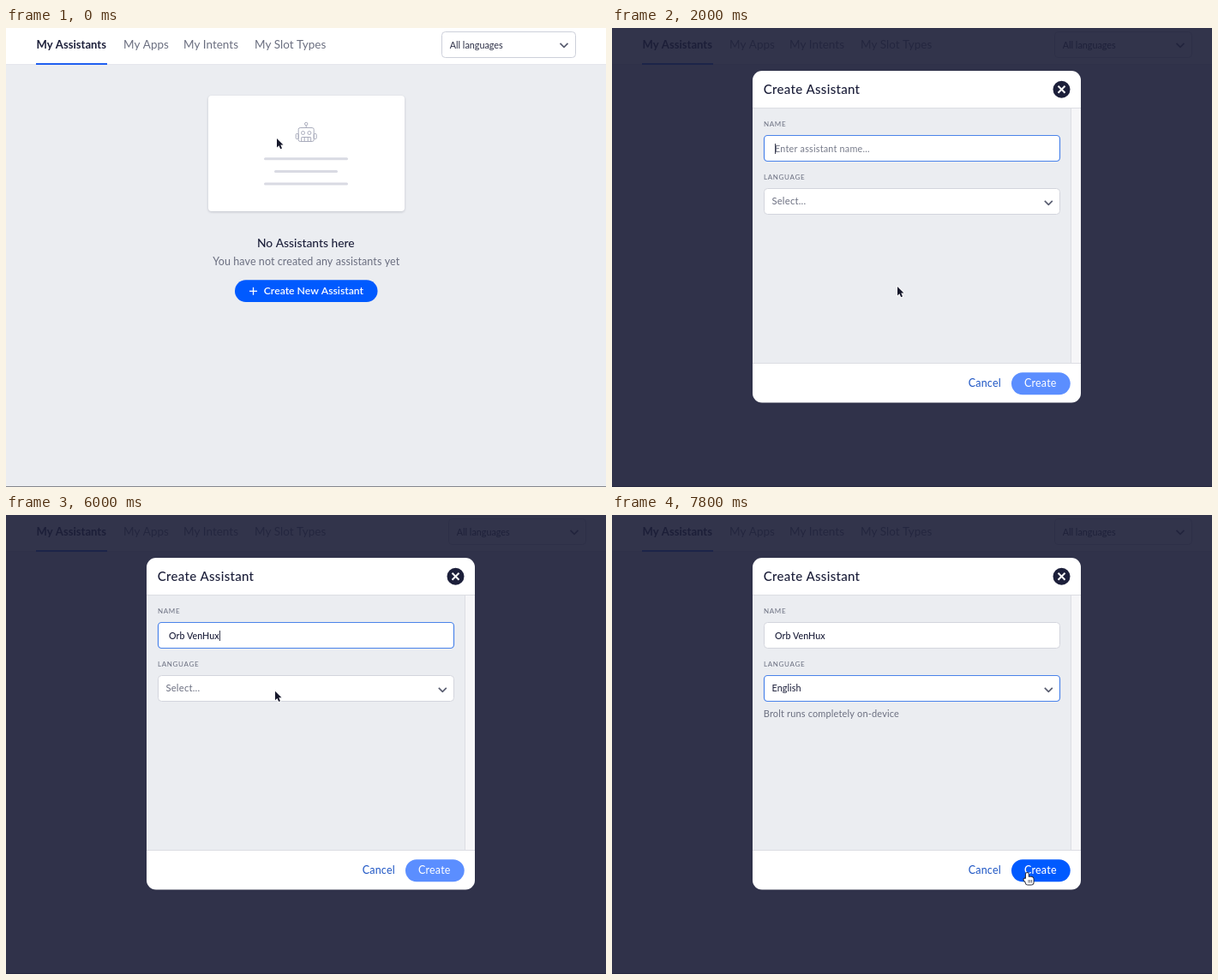
Write an HTML page with a canvas that moves like this. It is 700 px wide and 536 px high and loops after 8 s.

```html
<!DOCTYPE html>
<html lang="en">
<head>
<meta charset="utf-8">
<title>Create assistant</title>
<style>
html, body { margin: 0; width: 100%; height: 100%; overflow: hidden; background: #ebedf1; }
canvas { display: block; }
</style>
</head>
<body>
<canvas id="stage" width="700" height="536"></canvas>
<script>
const ctx = document.getElementById('stage').getContext('2d');
const LOOP = 8000, STEP = 200;
const INK = '#1c1f3a', TEXT = '#2b2e45', GREY = '#6b6f80', BLUE = '#005aff', FOCUS = '#4a83ea';
const PAGE = '#ebedf1', RULE = '#d3d5dd', VEIL = '#d9dce1';

const NAME = 'Orb VenHux';
const LANGUAGES = ['English', 'French', 'German', 'Italian', 'Japanese'];
const FADE = 1800, SHOWN = 2000, TYPE = 2600, TYPED = 5200, OPEN = 6200, PICK = 6800;

// Pointer stops, and moves between them with a sideways or upward bend
const START = [316, 129], NEW = [333, 302], ITEM = [279, 231], SAVE = [485, 418];
const MOVES = [
  { from: START, to: NEW, begin: 0, end: 1200, bend: k => [-25 * Math.sin(2 * Math.PI * k), 0] },
  { from: NEW, to: ITEM, begin: 5600, end: 6600, bend: k => [0, -75 * Math.sin(Math.PI * k)] },
  { from: ITEM, to: SAVE, begin: PICK, end: 7800, bend: () => [0, 0] }
];

const progress = (t, begin, end) => Math.min(1, Math.max(0, (t - begin) / (end - begin)));
const smooth = k => k * k * (3 - 2 * k);

function text(str, x, y, size, color, weight = 400, spacing = 0) {
  ctx.font = `${weight} ${size}px Lato, "Open Sans", sans-serif`;
  ctx.letterSpacing = spacing + 'px';
  ctx.fillStyle = color;
  ctx.fillText(str, x, y);
  return ctx.measureText(str).width;
}

function rect(x, y, w, h, color) {
  ctx.fillStyle = color;
  ctx.fillRect(x, y, w, h);
}

function paint(fill, stroke, width = 1) {
  if (fill) { ctx.fillStyle = fill; ctx.fill(); }
  if (stroke) { ctx.strokeStyle = stroke; ctx.lineWidth = width; ctx.stroke(); }
}

function box(x, y, w, h, r, fill, stroke, width) {
  ctx.beginPath();
  ctx.roundRect(x, y, w, h, r);
  paint(fill, stroke, width);
}

function line(points, color, width) {
  ctx.beginPath();
  points.forEach(([x, y]) => ctx.lineTo(x, y));
  paint(null, color, width);
}

function disc(x, y, r, fill, stroke) {
  ctx.beginPath();
  ctx.arc(x, y, r, 0, Math.PI * 2);
  paint(fill, stroke);
}

function chevron(x, y) {
  line([[x - 4.5, y - 2.2], [x, y + 2.3], [x + 4.5, y - 2.2]], '#5b5f72', 1.7);
}

function withShadow(color, blur, dy, drawIt) {
  ctx.save();
  ctx.shadowColor = color;
  ctx.shadowBlur = blur;
  ctx.shadowOffsetY = dy;
  drawIt();
  ctx.restore();
}

function robot(x, color) {
  disc(x, 112, 1.7, null, color);
  line([[x, 114], [x, 116.5]], color, 1);
  box(x - 9, 116.5, 18, 16, 2, null, color);
  box(x - 5.5, 127.5, 11, 5, 0.5, null, color);
  for (const side of [-1, 1]) {
    box(x + side * 10.5 - 1.5, 123.5, 3, 6, 1, null, color);
    disc(x + side * 3.7, 122.5, 2, null, color);
    line([[x + side * 2, 127.5], [x + side * 2, 132.5]], color, 1);
  }
}

// Without its scrollbar the page is wider, so centred parts move right.
function page(wide, veiled) {
  const mid = wide ? 356 : 350;
  const surface = veiled ? VEIL : '#fff';
  rect(0, 0, 700, 536, veiled ? VEIL : PAGE);
  rect(0, 0, 700, 42, surface);
  rect(0, 42, 700, 1, veiled ? '#d0d3d9' : '#e5e6ec');
  text('My Assistants', 35.5, 24, 13.1, INK, 700);
  text('My Apps', 137, 24, 13.5, GREY);
  text('My Intents', 207, 24, 13.5, GREY);
  text('My Slot Types', 290, 24, 13.5, GREY);
  rect(35, 41, 83, 2, '#1f5ff0');

  const left = wide ? 516.5 : 508.5, right = wide ? 676.5 : 664.5;
  box(left, 4.5, right - left, 30, 4, surface, veiled ? '#b9bcc6' : '#cdd0da');
  text('All languages', left + 9.2, 24, 10.8, TEXT);
  chevron(right - 13.5, 20);

  withShadow('rgba(30,34,60,.2)', 3, 1, () => box(mid - 114, 79, 229, 135, 4, surface));
  if (veiled) box(mid - 114.5, 79.5, 230, 135, 4, null, '#c3c6ce');
  robot(mid + 0.2, veiled ? '#8e91a0' : '#a9acbc');
  [98, 74, 98].forEach((w, i) =>
    box(mid - w / 2, 151.2 + i * 14.7, w, 3, 1.5, veiled ? '#a3a6b2' : '#d9dae3'));

  text('No Assistants here', mid - 57, 256, 13.8, INK, 500);
  text('You have not created any assistants yet', mid - 108.7, 277, 12.5, GREY, 400, 0.08);
  box(mid - 83, 294.3, 166.5, 25.7, 12.8, BLUE);
  line([[mid - 66, 307.3], [mid - 57, 307.3]], '#fff', 1.3);
  line([[mid - 61.5, 302.8], [mid - 61.5, 311.8]], '#fff', 1.3);
  text('Create New Assistant', mid - 49.2, 311.3, 12.2, '#fff', 600);
  rect(0, 535, 700, 1, '#85878d');
}

// First hint of the dialog while the page dims
function ghost() {
  box(164.5, 50.5, 382, 387, 11, null, '#dfe1e6');
  text('Create Assistant', 176.8, 77, 15, '#d0d3d9', 500, 0.3);
  disc(524.5, 71.8, 10, '#cfd2d8');
  box(466, 402.3, 68.7, 26, 13, '#d3d6dc');
}

function field(y, corners, focus) {
  box(177.5, y, 345, 30, corners, '#fff', focus ? FOCUS : RULE, focus ? 1.2 : 1);
}

function nameField(t) {
  const focus = t < OPEN;
  field(125.5, 4, focus);
  const count = t < TYPE ? 0 : Math.floor(1 + (NAME.length - 1) * progress(t, TYPE, TYPED));
  let end = 190;
  if (count) end += text(NAME.slice(0, count), 190, 144.7, 10.7, INK, 500);
  else text('Enter assistant name...', 190, 144.7, 10.8, '#777b8a', 400, 0.22);
  if (focus) rect(Math.round(end), 135, 1, 12, '#3a3d50');
}

function languageField(open, chosen) {
  field(187.5, open ? [4, 4, 0, 0] : 4, chosen);
  if (chosen) text(LANGUAGES[0], 186.6, 206, 10.9, INK);
  else text('Select...', 186.4, 206.4, 11.3, GREY, 400, 0.2);
  chevron(509.3, 204);
}

function menu() {
  const corners = [0, 0, 4, 4];
  withShadow('rgba(30,34,60,.25)', 5, 2, () => box(177.5, 217.5, 345, 152, corners, '#fff'));
  box(177.5, 217.5, 345, 152, corners, null, RULE);
  rect(178, 218, 333, 28, '#eff0f3');
  LANGUAGES.forEach((name, i) => text(name, 186.6, 235.7 + i * 28.35, 10.9, TEXT));
  rect(511, 218, 11, 151, '#fafafb');
  rect(511, 218, 1, 151, '#e6e7ea');
  box(514, 220.5, 6, 110.5, 3, '#b6b6b9');
}

function modal(t) {
  const open = t >= OPEN && t < PICK, chosen = t >= PICK;
  box(164, 50, 383, 387.5, 11, '#fff');
  text('Create Assistant', 176.8, 77, 15, INK, 500, 0.3);
  disc(524.5, 71.8, 10, INK);
  for (const s of [-4, 4]) line([[524.5 - s, 67.8], [524.5 + s, 75.8]], '#fff', 2);
  rect(164, 93, 383, 299, '#dcdde3');
  rect(164, 94, 371, 297, PAGE);
  rect(536, 94, 11, 297, '#f6f6f8');

  text('NAME', 177, 115, 8, GREY, 400, 0.65);
  text('LANGUAGE', 177, 177, 8, GREY, 400, 0.65);
  nameField(t);
  languageField(open, chosen);
  if (open) menu();
  if (chosen) text('Brolt runs completely on-device', 176.8, 235.7, 11, GREY, 400, 0.15);

  text('Cancel', 415.7, 419.2, 12.5, '#1d55c4', 400, 0.2);
  box(466, 402.3, 68.7, 26, 13, chosen ? BLUE : '#5b8eff');
  text('Create', 481, 419.2, 12.5, '#fff', chosen ? 500 : 400, 0.2);
}

function arrow() {
  ctx.beginPath();
  ctx.lineTo(0, 0);
  ctx.lineTo(0, 10.5);
  ctx.lineTo(2.4, 8.3);
  ctx.lineTo(4.2, 12.3);
  ctx.lineTo(6, 11.5);
  ctx.lineTo(4.3, 7.6);
  ctx.lineTo(7.5, 7.5);
  ctx.closePath();
  paint(null, '#fff', 1.8);
  paint('#16182b');
}

function hand() {
  ctx.beginPath();
  ctx.roundRect(-2, 0, 2.8, 9, 1.4);
  ctx.roundRect(-2.4, 4.8, 9, 8.7, 2.8);
  ctx.ellipse(-2.4, 8.8, 2.6, 1.3, 0.8, 0, Math.PI * 2);
  paint(null, '#2a2c3a', 2);
  paint('#fff');
  for (const x of [1, 2.8, 4.6]) line([[x, 8], [x, 11.5]], '#2a2c3a', 0.7);
}

function pointer(t) {
  if (t >= 2400 && t < MOVES[1].begin) return;
  const move = MOVES.findLast(m => t >= m.begin);
  const k = progress(t, move.begin, move.end), e = smooth(k), bend = move.bend(k);
  const [x, y] = move.from.map((a, i) => a + (move.to[i] - a) * e + bend[i]);
  const overNew = t < FADE && y > 294;
  const overItem = t >= OPEN && t < PICK && y > 218;
  const overSave = t > PICK && x > 466 && y > 402;
  ctx.save();
  ctx.translate(x, y);
  if (overNew || overItem || overSave) hand();
  else arrow();
  ctx.restore();
}

function draw(t) {
  const veiled = t >= FADE && t < SHOWN;
  page(t >= FADE, veiled);
  if (veiled) ghost();
  if (t >= SHOWN) {
    rect(0, 0, 700, 536, 'rgba(28,31,56,.9)');
    modal(t);
  }
  pointer(t);
}

function frame(now) {
  draw(Math.floor((now % LOOP) / STEP) * STEP);
  requestAnimationFrame(frame);
}
ctx.lineJoin = 'round';
draw(0);
requestAnimationFrame(frame);
</script>
</body>
</html>
```
